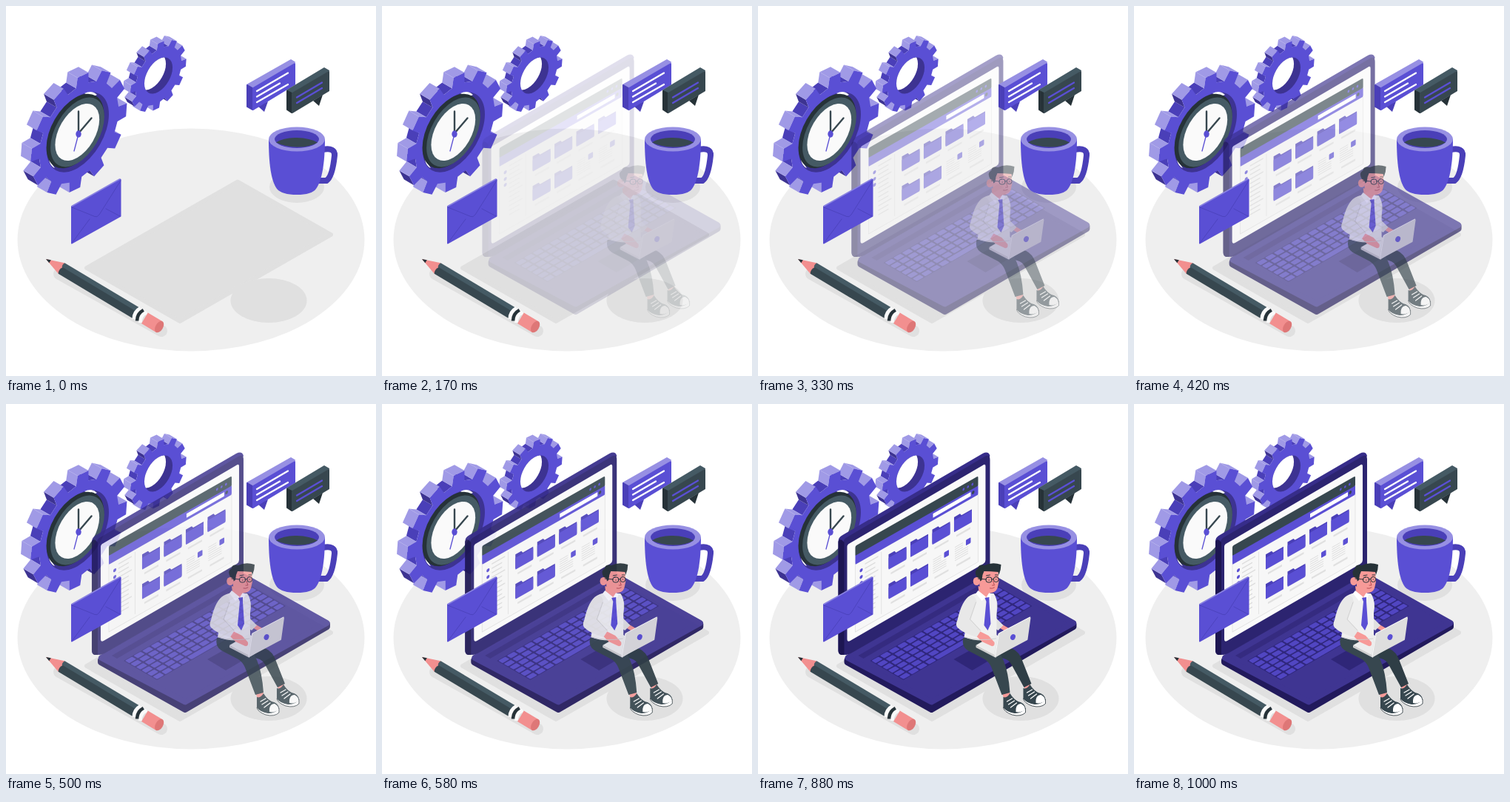
Recreate the animation shown at these times as an HTML page. Size 500 px wide and 500 px high, loop 1.04 s.

```html
<!DOCTYPE html>
<html lang="en">
<head>
<meta charset="utf-8">
<title>Desk scene</title>
<style>
html, body { margin: 0; height: 100%; overflow: hidden; background: #fff; }
svg { display: block; width: 100%; height: 100%; }
.line { fill: none; stroke-linecap: round; stroke-linejoin: round; }
.soft { stroke-linejoin: round; }
.skin { fill: #f79a98; }
</style>
</head>
<body>
<svg viewBox="0 0 500 500">
  <defs>
    <clipPath id="bore"><circle r="22" transform="matrix(.866 -.5 0 1 206 94)"/></clipPath>
  </defs>

  <ellipse cx="250" cy="316" rx="234.5" ry="150.5" fill="#efefef"/>
  <g fill="#e0e0e0">
    <path class="soft" stroke="#e0e0e0" stroke-width="6" d="M313 237.500 439 309 235 426 109 354Z"/>
    <ellipse cx="355" cy="398" rx="51.500" ry="30"/>
    <ellipse cx="393" cy="244.500" rx="37" ry="21.500"/>
  </g>

  <g id="gears"></g>

  <g id="clock"></g>
  <g class="line">
    <path d="M98 173V142.500M98 172 115.500 151.500" stroke="#37474f" stroke-width="2.400"/>
    <path d="M98 173 92 196" stroke="#5a4fd4" stroke-width="1.300"/>
  </g>
  <ellipse cx="98" cy="173" rx="3.700" ry="4.700" fill="#5a4fd4"/>

  <g id="device">
    <!-- base -->
    <path class="soft" fill="#221a5c" stroke="#221a5c" stroke-width="8" d="M122 346 315 236 428 297V301L236 413 122 349Z"/>
    <path class="soft" fill="#3f3592" stroke="#3f3592" stroke-width="8" d="M123 343 315 233 427.500 296 236 402.500Z"/>
    <!-- lid -->
    <path fill="#372d8a" d="M110 186Q110 180 116 177L305 67Q313 63 315 70L312 76 122 187 119 339 114 339Q110 338 110 333Z"/>
    <path fill="#2c2470" d="M117 187Q117 183 121 180.500L308 71Q315 67 315 75V229L127 337Q117 342 117 335Z"/>
    <path fill="#1d1652" d="M110 186Q111 182 115 184L118 187V339L114 339Q110 338 110 333Z"/>
    <path fill="#fafafa" d="M122 193Q122 190 125 188.500L305 83Q309 80 309 84V211Q309 214 306 216L126 320Q122 322 122 318Z"/>
    <path fill="#352b80" d="M137 340 318 235 325 239 144 344Z"/>
    <g id="window" transform="matrix(1 -.57 0 1 133 192)"></g>
    <g id="keys"></g>
    <path fill="#2f2678" d="M266 345 295 329 320 343 291 360Z"/>
  </g>

  <!-- envelope -->
  <path class="soft" fill="#5a4fd4" stroke="#5a4fd4" stroke-width="2" d="M89 271 154.500 234.500V284L89 320.500Z"/>
  <path class="line" stroke="#8b84e2" stroke-width="1.600" d="M89 270.500 153.500 234"/>
  <path class="line" stroke="#4a40b8" stroke-width=".8" d="M89 272 120 284.500Q123 286 126 282L155 236M90 319 113 288M135 274 154 284"/>

  <!-- speech bubbles -->
  <g class="soft" stroke-width="2">
    <path fill="#4a3fb8" d="M340 135 349 143 354 129Z"/>
    <path fill="#9790e3" stroke="#9790e3" d="M326 106.500 385 73 390 76 335 110Z"/>
    <path fill="#4a3fb8" stroke="#4a3fb8" d="M326 107 333 111V140L326 136Z"/>
    <path fill="#5a4fd4" stroke="#5a4fd4" d="M334 111 390 78V106L334 140Z"/>
    <path class="line" stroke="#fff" stroke-width="2.300" d="M339 115 381 90.500M339 122.500 370 104.500M339 130 381 106"/>
    <path fill="#263238" d="M415 128 423 135 428 120Z"/>
    <path fill="#455a64" stroke="#455a64" d="M380 114 430 84 436 87.500 387 117Z"/>
    <path fill="#263238" stroke="#263238" d="M380 115 386 118V144L380 140Z"/>
    <path fill="#37474f" stroke="#37474f" d="M387 118 436 89V114.500L387 144Z"/>
    <path class="line" stroke="#5a4fd4" stroke-width="2.300" d="M393 123.500 427 103.500M393 131 427 111"/>
  </g>

  <!-- cup -->
  <path class="line" stroke="#4a3fb8" stroke-width="8" d="M428 194Q445 191 444 202 441 231 433 236H420"/>
  <path fill="#5a4fd4" d="M355 180C355 212 358 236 366 247Q373 255 393 255T419 247C427 236 431 212 431 180Z"/>
  <ellipse cx="393" cy="180" rx="38" ry="16.500" fill="#9790e3"/>
  <ellipse cx="393" cy="180" rx="30" ry="12" fill="#4a3fb8"/>
  <path fill="#37474f" d="M365 184.500Q375 177.500 393 178T421 184.500Q410 191 393 190.500T365 184.500Z"/>

  <!-- pencil -->
  <path class="line" stroke="#e0e0e0" stroke-width="16" d="M72 362 210 439"/>
  <g transform="translate(75 354.500) rotate(30.900)">
    <path fill="#f28f8f" d="M-24.500 0 0-8.500 2 0 0 8.500Z"/>
    <path fill="#263238" d="M-24.500 0-18-2.300V2.300Z"/>
    <path fill="#455a64" d="M0-8.500H118V1H2Q-3-4 0-8.500Z"/>
    <path fill="#37474f" d="M1-2H118V8.500H0Q-3 3 1-2Z"/>
    <path fill="#f28f8f" d="M131-8.500H154V8.500H131Z"/>
    <g class="line" stroke-width="4.500" style="stroke-linecap:butt">
      <path stroke="#fafafa" d="M119-8.500Q114 0 119 8.500M129-8.500Q124 0 129 8.500"/>
      <path stroke="#263238" d="M124-8.500Q119 0 124 8.500"/>
    </g>
    <ellipse cx="154" rx="5" ry="8.500" fill="#de7777"/>
  </g>

  <g id="man">
    <!-- legs and shoes -->
    <path class="skin" d="M331 389 341 387 343 397 334 399ZM360 379 369 377 371 387 363 388Z"/>
    <path fill="#2f3e46" d="M306 317 346 331Q354 335 358 345L371 378 361 383 344 352Q341 346 334 344L300 335Z"/>
    <path fill="#37474f" d="M279 316Q276 327 285 333L308 345Q314 349 317 356L331 393 342 390Q340 362 333 346L320 318Z"/>
    <g id="shoe">
      <path fill="#fff" stroke="#263238" stroke-width=".8" d="M333 410Q334 416 345 420 357 423 363 417L363 411Z"/>
      <path fill="#37474f" d="M333 396Q338 398 342 391 347 399 353 402 362 404 363 411 358 418.500 348 418 337 416 333 410Z"/>
      <path fill="#fff" d="M350 412Q351 405 357 405 363 408 362 413 357 417.500 350 416Z"/>
      <path class="line" stroke="#fff" stroke-width="1.300" d="M338 402 345 398M340 406 348 401M343 410 351 404"/>
    </g>
    <use href="#shoe" x="27" y="-12"/>
    <!-- far arm, torso, neck -->
    <path class="line" stroke="#f79a98" stroke-width="6" d="M326 298 343 308"/>
    <path fill="#e0e0e0" d="M317 259Q326 262 325 275L323 289 333 299 326 306 313 297Z"/>
    <path fill="#f0f0f0" d="M288 259Q295 255 302 255L320 256Q325 262 324 274L324 317Q301 323 280 315Q284 300 279 285Z"/>
    <path class="skin" d="M299 246 315 250V257Q312 264 308 262L300 254Z"/>
    <path fill="#fff" d="M299 252 310 261 304 266 296 256ZM314 255 317 258 315 265 310 261Z"/>
    <path fill="#5a4fd4" d="M308 262 314 261 314 267 316 297 312 306 307 299 310 267Z"/>
    <!-- head -->
    <path class="skin" d="M300 226Q312 220 326 225L327 240 325 249Q322 256 314 255L303 254 301 246Z"/>
    <path fill="#263238" d="M298 235Q292 226 299 222 299 216 308 218 318 213 330 217 330 224 327 231L326 227Q316 226 307 226L305 231 304 238 301 240Z"/>
    <ellipse cx="297" cy="239.500" rx="4.700" ry="5.500" class="skin"/>
    <g class="line" stroke="#263238" stroke-width="1">
      <path d="M299 236 310 237M317 237 320 236.500M310 232 315 231M322 231 326 231"/>
      <rect x="309.500" y="234" width="8" height="7" rx="3"/>
      <rect x="320" y="233.500" width="6.500" height="7" rx="3"/>
      <path d="M313.500 238H314M323 237H323.400"/>
      <path stroke="#b94f55" d="M315 249Q318 250 321 248M319 239 321 245 318 245"/>
    </g>
    <!-- notebook -->
    <path fill="#ededed" d="M296 326 322 311 349 326 323 342Z"/>
    <path fill="#cfcfcf" d="M296 326 323 340 323 343 296 329Z"/>
    <path class="soft" fill="#dedede" stroke="#dedede" stroke-width="2" d="M327 311 369 289 365 318 322 341Z"/>
    <path class="line" stroke="#fafafa" stroke-width="1" d="M322 341 327 310 369 288"/>
    <ellipse cx="346" cy="315" rx="3.300" ry="4" transform="rotate(25 346 315)" fill="#5a4fd4"/>
    <!-- near arm -->
    <path class="skin" d="M301 307 313 313 321 322Q322 328 317 327L304 321 297 314Z"/>
    <path fill="#e8e8e8" d="M288 259Q295 257 297 267L289 291 303 306 297 315Q279 310 271 302 268 298 271 292Q277 265 288 259Z"/>
    <path class="line" stroke="#cfcfcf" stroke-width=".9" d="M296 268 288 291 302 306M281 315Q301 321 323 317"/>
  </g>
</svg>

<script>
const $ = id => document.getElementById(id);
const disc = (x, y, r, fill, more = '') =>
  `<g ${more}><circle r="${r}" fill="${fill}" transform="matrix(.866 -.5 0 1 ${x} ${y})"/></g>`;
const poly = (pts, fill) => `<polygon points="${pts.join(' ')}" fill="${fill}"/>`;
const rect = (x, y, w, h, fill, rx = 0) =>
  `<rect x="${x}" y="${y}" width="${w}" height="${h}" rx="${rx}" fill="${fill}"/>`;

// Isometric gear with twelve teeth, extruded by (dx, dy)
function gear(cx, cy, outer, root, phase, dx, dy) {
  const pts = [];
  for (let i = 0; i < 12; i++) {
    for (const [off, r] of [[-9, root], [-6.5, outer], [6.5, outer], [9, root]]) {
      const a = (phase + i * 30 + off) * Math.PI / 180;
      const u = r * Math.cos(a), v = r * Math.sin(a);
      pts.push([cx + .866 * u, cy - .5 * u + v]);
    }
  }
  let gaps = '', teeth = '';
  pts.forEach((p, i) => {
    const q = pts[(i + 1) % pts.length];
    const nx = q[1] - p[1], ny = p[0] - q[0];
    if (nx * dx + ny * dy <= 0) return;
    const shade = ny / Math.hypot(nx, ny) < .05 ? '#a09ae6' : '#3d3392';
    const quad = fill => poly([p, q, [q[0] + dx, q[1] + dy], [p[0] + dx, p[1] + dy]], fill);
    if (i % 4 == 3) gaps += quad('#4a3fb8');
    else teeth += quad(shade);
  });
  return gaps + teeth + poly(pts, '#5a4fd4');
}

$('gears').innerHTML =
  gear(206, 94.5, 43.5, 36, 5, -10, -6) +
  disc(206, 94, 22, '#3d3392') + disc(197, 89, 22, '#fff', 'clip-path="url(#bore)"') +
  gear(98.5, 171, 75, 62, 5, -13.5, -7.8);

$('clock').innerHTML =
  disc(97, 170.5, 48.5, '#3d3392') +
  '<path fill="#fff" d="M106 118Q116 113 123 120L116 123ZM58 208 66 219Q60 217 58 208Z"/>' +
  disc(93.5, 169, 45, '#263238') + disc(96.5, 170.5, 42, '#455a64') +
  disc(96.3, 170.5, 34.5, '#fafafa');

function drawWindow() {
  const purple = '#5a4fd4', grey = '#dcdcdc';
  let s = rect(0, 2, 166, 114, '#f7f7f7') + rect(0, 0, 166, 14, '#37474f', 2) +
    rect(0, 13, 166, 12, purple) + rect(105, 16, 51, 5.5, '#fff') +
    rect(157.5, 16, 3.5, 4.5, '#37474f', 2) + rect(35, 28, .7, 84, grey) +
    '<path d="M0 24V116H166V24" fill="none" stroke="#e0e0e0" stroke-width=".8"/>';
  for (const x of [145, 151, 157]) s += rect(x, 5, 2.6, 3.4, purple, 1.3);
  for (let i = 0; i < 12; i++) s += rect(13, 31 + i * 6, i % 3 ? 14 : 18, 1.5, grey);
  for (const y of [35, 44, 52]) s += rect(6, y, 4, 4.5, purple, 2);
  for (let i = 0; i < 8; i++) {
    const x = 45 + i % 4 * 29.5, y = i < 4 ? 37 : 77;
    if (i < 6) {
      s += `<path fill="#4a3fb8" d="M${x} ${y}h8l2 3h14v16h-24z"/>` + rect(x, y + 4.5, 24, 16, purple, 1);
    } else {
      for (let k = 0; k < 7; k++) s += rect(x + 1, y + 1 + k * 3, k < 3 ? 11 : 18, 1, grey);
      s += rect(x + 16, y, 6.5, 7.5, purple, 1);
    }
    s += rect(x + 3, y + 26, 19, 2.6, '#e0e0e0');
  }
  $('window').innerHTML = s;
}

function drawKeys() {
  let s = rect(0, 0, 15, 6, '#30277d');
  for (let row = 0; row < 6; row++) {
    for (let col = 0; col < 15; col++) {
      const space = row == 5 && col == 4;
      s += rect(col + .09, row + .1, space ? 5.82 : .82, .78, '#5146c2', .12);
      if (space) col += 5;
    }
  }
  $('keys').innerHTML = `<g transform="matrix(11.6 -6.67 7.5 4.33 153 347)">${s}</g>`;
}

drawWindow();
drawKeys();

// Cubic bezier easing (.36, -.01, .5, 1.38), which overshoots near the end
function ease(x) {
  if (x >= 1) return 1;
  const curve = (s, a, b) => 3 * a * s * (1 - s) ** 2 + 3 * b * s * s * (1 - s) + s ** 3;
  let lo = 0, hi = 1;
  for (let i = 0; i < 24; i++) {
    const mid = (lo + hi) / 2;
    if (curve(mid, .36, .5) < x) lo = mid; else hi = mid;
  }
  return curve(lo, -.01, 1.38);
}

const LOOP = 1040, LEAD = 30;
const start = performance.now();

function draw() {
  const t = (performance.now() - start) % LOOP;
  const p = t < 40 ? 0 : ease((t + LEAD) / 1000);
  for (const id of ['device', 'man']) {
    $(id).setAttribute('transform', `translate(${30 * (1 - p)} 0)`);
    $(id).setAttribute('opacity', Math.max(0, Math.min(1, p)));
  }
  requestAnimationFrame(draw);
}
draw();
</script>
</body>
</html>
```
